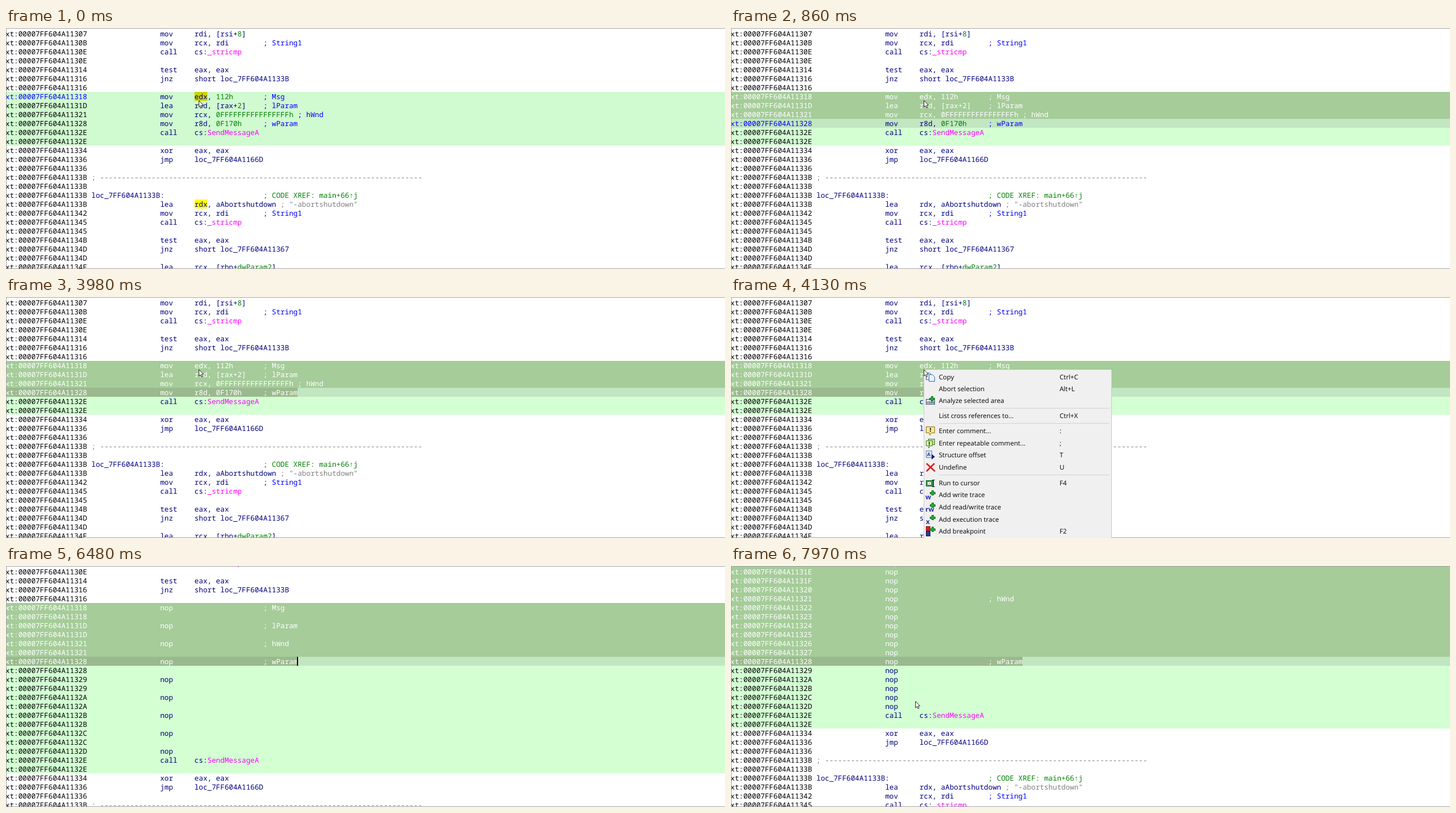
Animation of 1280x430 px, one loop 8 s. Source, as an HTML page with a canvas:

```html
<!DOCTYPE html>
<html lang="en">
<head>
<meta charset="utf-8">
<title>Disassembly patch</title>
<style>
html, body { margin: 0; width: 100%; height: 100%; overflow: hidden; background: #fff; }
canvas { display: block; }
</style>
</head>
<body>
<canvas id="stage" width="1280" height="430"></canvas>
<script>
const ctx = document.getElementById('stage').getContext('2d');
const LOOP = 8000, ROW = 16, CHAR = 7.65, CURRENT = 10;
const CODE_FONT = '12.75px "Noto Sans Mono", "DejaVu Sans Mono", monospace';
const MENU_FONT = '11.6px "Open Sans", "Noto Sans", sans-serif';
const NAVY = '#000080', BLUE = '#0000ff', GREEN = '#008000', GRAY = '#808080', PINK = '#ff00ff';
const PATCH = '#d3ffd3', SELECTED = '#a5cc99', ACTIVE = '#c2e6c2', ACTIVE_SELECTED = '#9bb98e';

const colX = col => -1 + col * CHAR;
const rowY = row => 2 + row * ROW;

// Each line: last address digits | mnemonic | operands | comment
const parse = text => text.trim().split('\n').map(line => line.split('|').map(s => s.trim()));
const tail = parse(`
1132E|call|cs:SendMessageA
1132E
11334|xor|eax, eax
11336|jmp|loc_7FF604A1166D
11336
1133B|rule
1133B
1133B|label|loc_7FF604A1133B:|; CODE XREF: main+66↑j
1133B|lea|rdx, aAbortshutdown|; "-abortshutdown"
11342|mov|rcx, rdi|; String1
11345|call|cs:_stricmp
11345
1134B|test|eax, eax
1134D|jnz|short loc_7FF604A11367
1134D
1134F|lea|rcx, [rbp+dwParam2]`);
const head = parse(`
11307|mov|rdi, [rsi+8]
1130B|mov|rcx, rdi|; String1
1130E|call|cs:_stricmp
1130E
11314|test|eax, eax
11316|jnz|short loc_7FF604A1133B
11316`);
const message = parse(`
11318|mov|edx, 112h|; Msg
1131D|lea|r9d, [rax+2]|; lParam
11321|mov|rcx, 0FFFFFFFFFFFFFFFFh|; hWnd
11328|mov|r8d, 0F170h|; wParam`);

const notes = { '11318': '; Msg', '1131D': '; lParam', '11321': '; hWnd', '11328': '; wParam' };
const hex = n => n.toString(16).toUpperCase();
const nop = n => [hex(n), 'nop', '', notes[hex(n)]];
const range = (from, to) => Array.from({ length: to - from + 1 }, (_, i) => from + i);
const spacedNops = [0x11318, 0x1131D, 0x11321, ...range(0x11328, 0x1132D)]
  .flatMap(n => n < 0x1132D ? [nop(n), [hex(n)]] : [nop(n)]);

// first: row number of the first line; green: first and last row of the patched block
const views = {
  before: { first: 0, green: [7, 12], lines: [...head, ...message, ...tail] },
  spaced: { first: -1, green: [4, 22], lines: [...head.slice(2), ...spacedNops, ...tail] },
  after: { first: -1, green: [-1, 17], lines: [...range(0x1131D, 0x1132D).map(nop), ...tail] }
};

function rect(color, x, y, w, h) {
  ctx.fillStyle = color;
  ctx.fillRect(x, y, w, h);
}

function text(str, x, y, color) {
  ctx.fillStyle = color;
  ctx.fillText(str, x, y);
}

function shape(points, fill, stroke, width = 1) {
  ctx.beginPath();
  points.forEach(([x, y]) => ctx.lineTo(x, y));
  ctx.closePath();
  ctx.fillStyle = fill;
  ctx.fill();
  if (stroke) {
    ctx.strokeStyle = stroke;
    ctx.lineWidth = width;
    ctx.stroke();
  }
}

function frame(x, y, w, h, fill, stroke) {
  rect(stroke, x, y, w, h);
  rect(fill, x + 1, y + 1, w - 2, h - 2);
}

function drawOperands(str, col, y, forced) {
  const special = /(_stricmp|SendMessageA)|(\b\d[0-9A-F]*h\b|(?<=\+)\w+)/;
  for (let rest = str; rest;) {
    const m = rest.match(special);
    const plain = m ? rest.slice(0, m.index) : rest;
    text(plain, colX(col), y, forced || NAVY);
    col += plain.length;
    if (!m) break;
    text(m[0], colX(col), y, forced || (m[1] ? PINK : GREEN));
    col += m[0].length;
    rest = rest.slice(plain.length + m[0].length);
  }
}

function drawLine([addr, op, args = '', note], row, white, active) {
  const y = rowY(row) + 13, forced = white && '#fff';
  text('xt:00007FF604A' + addr, colX(0), y, forced || (active ? BLUE : '#000'));
  if (op === 'rule') return text('; ' + '-'.repeat(75), colX(20), y, GRAY);
  if (op === 'label') {
    text(args, colX(20), y, NAVY);
  } else if (op) {
    text(op, colX(36), y, forced || NAVY);
    drawOperands(args, 44, y, forced);
  }
  if (note) {
    const color = note.includes('XREF') ? GREEN : note.includes('"') ? GRAY : BLUE;
    const col = op === 'label' ? 60 : Math.max(60, 45 + args.length);
    text(note, colX(col), y, forced || color);
  }
}

function drawListing(view, selectFrom, active, toEnd, started) {
  const [top, bottom] = view.green;
  rect(started ? PATCH : '#d0fad0', 0, rowY(top), 1280, (bottom - top + 1) * ROW);
  if (started) {
    rect(SELECTED, 0, rowY(selectFrom), 1280, (active - selectFrom) * ROW);
    rect(ACTIVE, 0, rowY(active), 1280, ROW);
    if (toEnd) rect(ACTIVE_SELECTED, 0, rowY(active), 519, ROW);
  } else {
    rect('#c8d400', colX(44), rowY(7), 3 * CHAR, ROW);
    rect('#ffff00', colX(44), rowY(19), 3 * CHAR, ROW);
  }
  ctx.font = CODE_FONT;
  view.lines.forEach((line, i) => {
    const row = view.first + i;
    if (row > 26) return;
    const white = started && row >= selectFrom && (row < active || (toEnd && row === active));
    drawLine(line, row, white, row === active);
  });
  const border = '#a0a0a0';
  rect(border, 0, 0, 1280, 1);
  rect(border, 0, 0, 1, 430);
  rect(border, 0, 429, 1280, 1);
}

function plus(x, y) {
  rect('#0a6b1c', x + 3, y, 4, 9);
  rect('#0a6b1c', x, y + 3, 10, 4);
  rect('#22b03c', x + 4, y + 1, 2, 7);
  rect('#22b03c', x + 1, y + 4, 8, 2);
}

function letters(str, x, y, size, color) {
  ctx.font = `bold ${size}px "Open Sans", sans-serif`;
  text(str, x, y, color);
}

function page(x, y) {
  shape([[x, y], [x + 6, y], [x + 10, y + 4], [x + 10, y + 12], [x, y + 12]], '#e8f2ff', '#2c62b0');
}

function bubble(x, y, w, h, fill, stroke) {
  shape([[x, y], [x + w, y], [x + w, y + h], [x + w / 2 + 2, y + h],
    [x + w / 2 - 1, y + h + 4], [x + w / 2 - 2, y + h], [x, y + h]], fill, stroke);
  rect('#333', x + w / 2 - 1, y + 2, 2, 4);
  rect('#333', x + w / 2 - 1, y + 7, 2, 2);
}

function trace(label, x, y) {
  letters(label, x, y + 8, 12, '#2a2fa8');
  plus(354, y - 8);
}

const icons = {
  copy(y) { page(347.5, y - 7.5); page(352.5, y - 4.5); },
  code(y) {
    frame(347, y - 3, 16, 10, '#e4eaf0', '#334a66');
    letters('CODE', 348.5, y + 5, 5, '#223');
    plus(353, y - 8);
  },
  note(y) { bubble(347.5, y - 7.5, 15, 11, '#fbe58c', '#8a6a1c'); },
  notes(y) {
    frame(351, y - 8, 12, 11, '#b9e08e', '#3c7a1e');
    bubble(347.5, y - 4.5, 11, 9, '#d8f0a8', '#3c7a1e');
  },
  struct(y) {
    frame(347, y - 8, 11, 13, '#dce9fa', '#5a7fb5');
    letters('A', 349, y + 2, 9, '#2a4a90');
    shape([[357, y - 2], [363, y + 3], [357, y + 8]], '#1c1c80');
  },
  cross(y) {
    ctx.strokeStyle = '#d81e1e';
    ctx.lineWidth = 2.6;
    ctx.beginPath();
    ctx.moveTo(348, y - 7); ctx.lineTo(363, y + 7);
    ctx.moveTo(362, y - 7); ctx.lineTo(348, y + 7);
    ctx.stroke();
  },
  run(y) {
    frame(347, y - 5, 13, 11, '#2fa24a', '#0c5a20');
    rect('#e8ffe8', 350, y - 2, 6, 5);
    rect('#2fa24a', 352, y, 2, 1);
    rect('#222', 360, y - 6, 1, 13);
    rect('#222', 358, y - 6, 5, 1);
    rect('#222', 358, y + 6, 5, 1);
  },
  write(y) { trace('w', 346, y); },
  readWrite(y) { trace('rw', 346, y); },
  execute(y) { trace('x', 347, y); },
  breakpoint(y) {
    frame(347, y - 9, 8, 9, '#d82020', '#7a1010');
    frame(347, y, 8, 9, '#2a3a9c', '#181c50');
    plus(354, y - 8);
  }
};

const menu = [
  [143, 'Copy', 'Ctrl+C', 'copy'],
  [164, 'Abort selection', 'Alt+L'],
  [185, 'Analyze selected area', '', 'code'],
  [212, 'List cross references to...', 'Ctrl+X'],
  [239, 'Enter comment...', ':', 'note'],
  [261, 'Enter repeatable comment...', ';', 'notes'],
  [282, 'Structure offset', 'T', 'struct'],
  [304, 'Undefine', 'U', 'cross'],
  [332, 'Run to cursor', 'F4', 'run'],
  [353, 'Add write trace', '', 'write'],
  [375, 'Add read/write trace', '', 'readWrite'],
  [397, 'Add execution trace', '', 'execute'],
  [418, 'Add breakpoint', 'F2', 'breakpoint']
];

function drawMenu() {
  frame(343, 129, 335, 310, '#f0f0f0', '#c8c8c8');
  for (const y of [198, 225, 317]) rect('#d2d2d2', 370, y, 304, 1);
  for (const [y, label, key, icon] of menu) {
    ctx.font = MENU_FONT;
    text(label, 370, y + 4, '#000');
    text(key, 585, y + 4, '#000');
    if (icon) icons[icon](y);
  }
}

function drawPointer(x, y) {
  const outline = [[0, 0], [0, 11.5], [2.6, 9.2], [4.4, 13.2], [6.2, 12.4], [4.5, 8.5], [8, 8.2]];
  shape(outline.map(([dx, dy]) => [x + 0.5 + dx, y + 0.5 + dy]), '#fff', '#222');
}

// [start time, x, y]; no position hides the pointer
const pointerSteps = [
  [0, 343, 129], [5360, 347, 138], [5500],
  [7460, 373, 364], [7580, 362, 313], [7730, 345, 277], [7850, 333, 252], [7970, 328, 241]
];
const caretToggles = [1010, 1570, 2110, 2540, 3090, 3550, 3860, 3980, 6480, 7030, 7460, 7970];
const activeRow = t => t < 440 ? 7 : t < 590 ? 8 : t < 860 ? 9 : CURRENT;

function render(t) {
  const view = t < 6480 ? views.before : t < 6600 ? views.spaced : views.after;
  const selectFrom = view === views.before ? 7 : view.green[0];
  rect('#fff', 0, 0, 1280, 430);
  drawListing(view, selectFrom, activeRow(t), t >= 1010, t >= 440);
  if (caretToggles.filter(at => at <= t).length % 2) rect('#000', 518, rowY(CURRENT), 2, ROW);
  if (t >= 4130 && t < 6480) drawMenu();
  const [, x, y] = pointerSteps.findLast(([at]) => at <= t);
  if (x !== undefined) drawPointer(x, y);
}

ctx.textRendering = 'geometricPrecision';
const start = performance.now();
function tick() {
  render((performance.now() - start) % LOOP);
  requestAnimationFrame(tick);
}
tick();
</script>
</body>
</html>
```
